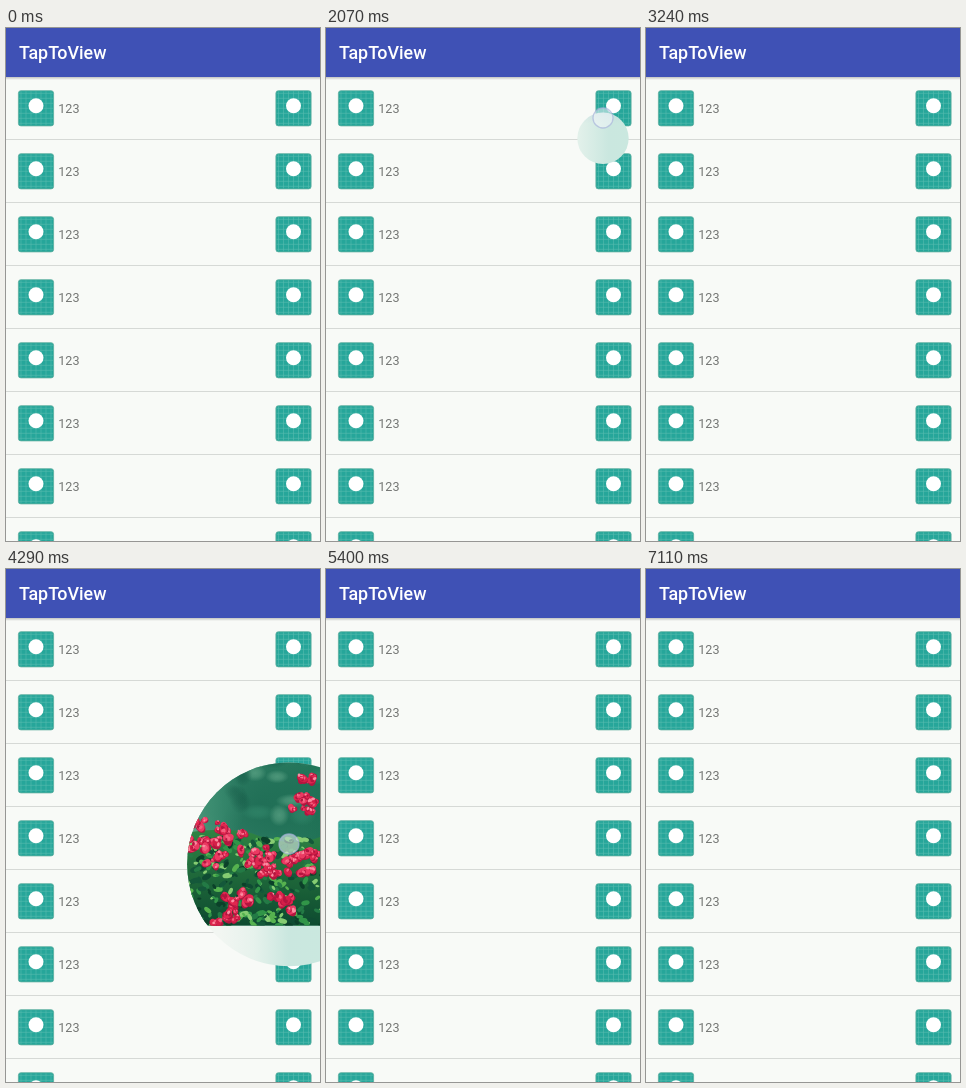
Write an HTML page that moves like this. It is 314 by 513 pixels and loops after 7500 ms.

```html
<!DOCTYPE html>
<html lang="en">
<head>
<meta charset="utf-8">
<title>TapToView</title>
<style>
html, body { margin: 0; width: 100%; height: 100%; overflow: hidden; background: #f8faf7; }
svg { display: block; width: 314px; height: 513px; }
text { font-family: Roboto, sans-serif; }
</style>
</head>
<body>
<svg viewBox="0 0 314 513" width="314" height="513">
  <defs>
    <linearGradient id="shade" x1="0" y1="0" x2="0" y2="1">
      <stop offset="0" stop-color="#000" stop-opacity=".22"/>
      <stop offset="1" stop-color="#000" stop-opacity="0"/>
    </linearGradient>
    <linearGradient id="sides">
      <stop offset="0" stop-color="#cfe9e1"/>
      <stop offset=".1" stop-color="#d4ece5"/>
      <stop offset=".24" stop-color="#ebf4ef"/>
      <stop offset=".36" stop-color="#f2f6f2"/>
      <stop offset=".68" stop-color="#f2f6f2"/>
      <stop offset=".79" stop-color="#e6f2ec"/>
      <stop offset=".9" stop-color="#cae7df"/>
      <stop offset="1" stop-color="#cae8df"/>
    </linearGradient>
    <linearGradient id="topBlur" x1="0" y1="0" x2="0" y2="1">
      <stop offset="0" stop-color="#3f51b5"/>
      <stop offset=".24" stop-color="#4254b6" stop-opacity=".95"/>
      <stop offset=".5" stop-color="#5565bd" stop-opacity=".58"/>
      <stop offset=".75" stop-color="#7a87cb" stop-opacity=".2"/>
      <stop offset="1" stop-color="#9aa5d8" stop-opacity="0"/>
    </linearGradient>
    <linearGradient id="trees">
      <stop offset="0" stop-color="#6fae78"/>
      <stop offset=".3" stop-color="#a6d3a8"/>
      <stop offset=".55" stop-color="#84bfa0"/>
      <stop offset=".7" stop-color="#3d8d72"/>
      <stop offset="1" stop-color="#217457"/>
    </linearGradient>
    <linearGradient id="bushFill" x1="0" y1="0" x2="0" y2="1">
      <stop offset="0" stop-color="#2f8443"/>
      <stop offset="1" stop-color="#0d4a30"/>
    </linearGradient>
    <linearGradient id="cypress" x1="0" y1="0" x2="0" y2="1">
      <stop offset="0" stop-color="#2f7a5e"/>
      <stop offset="1" stop-color="#4f9a7a"/>
    </linearGradient>
    <filter id="soft" x="-50%" y="-50%" width="200%" height="200%"><feGaussianBlur stdDeviation="1.2"/></filter>
    <clipPath id="frame"><rect y="157" width="314" height="199.5"/></clipPath>
    <clipPath id="reveal"><circle id="hole"/></clipPath>
    <g id="tile">
      <rect x=".4" y=".4" width="35.2" height="35.2" rx="2.5" fill="#26a69a" stroke="#5fae9f" stroke-width=".8"/>
      <path id="grid" stroke="#6cc4b8" stroke-width=".6" opacity=".7"/>
      <circle cx="18" cy="15.5" r="7.5" fill="#fff"/>
    </g>
  </defs>

  <rect width="314" height="513" fill="#f8faf7"/>
  <g id="list"></g>
  <rect y="49" width="314" height="3" fill="url(#shade)"/>
  <rect width="314" height="49" fill="#3f51b5"/>
  <text x="13" y="31" font-size="17.9" font-weight="500" fill="#fff">TapToView</text>

  <g id="view" clip-path="url(#reveal)">
    <rect width="314" height="513" fill="url(#sides)"/>
    <g id="corners"></g>
    <rect width="314" height="96" fill="url(#topBlur)"/>
    <g id="photo" clip-path="url(#frame)"></g>
  </g>
  <circle id="dot" r="10" fill="#f2f6fa" fill-opacity=".55" stroke="#a9b5dc" stroke-opacity=".7" stroke-width="1.3"/>
</svg>
<script>
const NS = 'http://www.w3.org/2000/svg';
const $ = id => document.getElementById(id);
const LOOP = 7500, OPEN = 400, CLOSE = 170, REACH = Math.hypot(314, 513);

function add(parent, tag, attrs, text) {
  const el = document.createElementNS(NS, tag);
  for (const k in attrs) el.setAttribute(k, attrs[k]);
  if (text) el.textContent = text;
  parent.appendChild(el);
  return el;
}

let seed = 11;
function rand(a, b) {
  seed = (seed * 16807) % 2147483647;
  return a + (b - a) * seed / 2147483647;
}
const pick = list => list[Math.floor(rand(0, list.length))];

// ellipse of one colour that fades out towards its rim
function glow(g, cx, cy, rx, ry, color, opacity = 1) {
  const id = 'glow' + color.slice(1);
  if (!$(id)) {
    const grad = add(document.querySelector('defs'), 'radialGradient', { id });
    for (const [offset, alpha] of [[0, 1], [.45, .75], [1, 0]])
      add(grad, 'stop', { offset, 'stop-color': color, 'stop-opacity': alpha });
  }
  add(g, 'ellipse', { cx, cy, rx, ry, opacity, fill: `url(#${id})` });
}

function buildList() {
  let d = '';
  for (let p = 3; p < 35; p += 5) d += `M${p} 1V35M1 ${p}H35`;
  $('grid').setAttribute('d', d);
  for (let i = 0; i < 9; i++) {
    const row = add($('list'), 'g', { transform: `translate(0 ${49 + i * 63})` });
    for (const x of [12, 269.5]) add(row, 'use', { href: '#tile', x, y: 13.3 });
    add(row, 'text', { x: 52.3, y: 35.8, 'font-size': 12.6, fill: '#747674' }, '123');
    add(row, 'rect', { y: 62, width: 314, height: 1, fill: '#d6d9d6' });
  }
}

function petal(g, x, y, r, fill) {
  const turn = `rotate(${rand(0, 180)} ${x} ${y})`;
  add(g, 'ellipse', { cx: x, cy: y, rx: r, ry: r * .7, fill, transform: turn });
}

function rose(g, x, y, r) {
  petal(g, x, y + r * .2, r * 1.1, '#b3153f');
  petal(g, x, y, r, pick(['#e0274f', '#ea3a62', '#d41f48']));
  for (let i = 0; i < 3; i++)
    petal(g, x + rand(-.6, .6) * r, y + rand(-.6, .3) * r, r * .38, pick(['#fb8ea3', '#f4607f', '#b3153f']));
}

function cluster(g, x, y, spread, n) {
  for (let i = 0; i < n; i++)
    rose(g, x + rand(-spread, spread), y + rand(-spread, spread) * .6, rand(2.5, 5.5));
}

function leaves(g, n, x0, x1, yTop) {
  for (let i = 0; i < n; i++) {
    const x = rand(x0, x1), y = rand(yTop(x), 358), r = rand(2, 5);
    add(g, 'ellipse', {
      cx: x, cy: y, rx: r, ry: r * .55, transform: `rotate(${rand(-70, 70)} ${x} ${y})`,
      fill: pick(['#56b24f', '#319548', '#86cc72', '#0b4029', '#14583a', '#0f4c33', '#237a45'])
    });
  }
}

function buildPhoto() {
  const g = $('photo');
  add(g, 'rect', { y: 157, width: 314, height: 200, fill: 'url(#trees)' });
  glow(g, 255, 235, 85, 60, '#1c6a52', .8);
  for (let i = 0; i < 26; i++)
    glow(g, rand(200, 320), rand(155, 250), rand(7, 17), rand(5, 12), pick(['#67ad8e', '#155a47', '#348a6d']), .6);
  for (let i = 0; i < 22; i++)
    glow(g, rand(0, 110), rand(160, 250), rand(8, 18), rand(6, 13), pick(['#d3ecc0', '#57a763', '#8cc987']), .7);
  glow(g, 115, 225, 38, 38, '#b9dfb8', .8);
  glow(g, 62, 156, 48, 16, '#f4fae4');
  glow(g, 155, 160, 75, 34, '#fbfdf2');
  glow(g, 165, 178, 50, 38, '#f0f8e8', .8);
  for (const [x, top, w] of [[149, 165, 11], [173, 175, 10]])
    add(g, 'path', {
      d: `M${x} ${top}C${x - w} ${top + 10} ${x - w} ${top + 30} ${x - w} 275H${x + w}C${x + w} ${top + 30} ${x + w} ${top + 10} ${x} ${top}`,
      fill: 'url(#cypress)', filter: 'url(#soft)', opacity: .9
    });
  glow(g, 205, 235, 35, 40, '#3c8f72', .7);

  add(g, 'path', { d: 'M0 285Q50 270 100 285V357H0Z', fill: '#1d6145', opacity: .85 });
  leaves(g, 70, 0, 95, () => 275);
  for (const [x, y] of [[24, 294], [40, 292], [14, 322], [58, 300], [78, 268]]) cluster(g, x, y, 8, 6);

  // fence, narrowing with distance
  const iron = '#0d3038';
  for (let i = 0; i < 12; i++) {
    const x = 6 + 12.1 * i - .345 * i * i, top = 158 + x * .5, w = 5 - i * .18;
    add(g, 'path', { d: `M${x} ${top - 5}L${x + w / 2} ${top + 3}V357H${x - w / 2}V${top + 3}Z`, fill: iron });
  }
  add(g, 'path', { d: 'M0 183L106 231V236L0 190Z', fill: '#1f4f59' });
  add(g, 'path', { d: 'M103.5 209H115V268H103.5ZM102 203H117V209H102Z', fill: '#1f4f59' });
  add(g, 'circle', { cx: 110.5, cy: 194.5, r: 5.2, fill: iron });
  add(g, 'path', { d: 'M107 199H114V204H107Z', fill: iron });

  glow(g, 8, 243, 30, 18, '#4bb548');
  glow(g, 60, 328, 40, 16, '#5aba4a', .85);
  glow(g, 20, 338, 36, 17, '#4aa848', .8);
  glow(g, 78, 325, 14, 12, '#dd8a4e', .8);

  add(g, 'path', { d: 'M72 357Q76 290 98 278Q128 266 160 268Q205 256 245 264Q285 280 314 268V357Z', fill: 'url(#bushFill)' });
  leaves(g, 520, 78, 316, x => 268 + Math.max(0, 112 - x) * .6);
  const spots = [[204, 262, 20, 20], [184, 270, 16, 12], [250, 288, 17, 18], [262, 300, 13, 11], [104, 270, 12, 12],
    [98, 297, 13, 11], [232, 330, 13, 12], [276, 334, 13, 11], [298, 234, 14, 16], [300, 208, 8, 6],
    [145, 314, 10, 9], [292, 294, 16, 13], [155, 270, 12, 6], [208, 292, 12, 7], [227, 345, 9, 6],
    [207, 354, 5, 3], [230, 265, 10, 7], [68, 342, 4, 3], [308, 285, 7, 6]];
  for (const s of spots) cluster(g, ...s);
}

const holds = [
  { down: 1680, open: 2018, up: 2790, x: 277, y: 90 },
  { down: 3990, open: 4183, up: 4880, x: 283, y: 275 },
  { down: 5640, open: 5850, up: 6640, x: 281.5, y: 454 }
];
const clamp = v => Math.min(1, Math.max(0, v));
const ease = v => .5 - .5 * Math.cos(Math.PI * clamp(v));

function place(el, x, y) {
  el.setAttribute('cx', x);
  el.setAttribute('cy', y);
}

function draw(t) {
  const dot = $('dot'), view = $('view'), hole = $('hole');
  const p = clamp((t - 770) / 640);
  const scroll = 20.5 * Math.sin(Math.PI * p) ** 2;
  $('list').setAttribute('transform', `translate(0 ${-scroll})`);

  let dotAlpha = 0, viewAlpha = 0;
  if (t >= 720 && t < 1440) {
    dotAlpha = 1;
    place(dot, 225.5, 157 - scroll);
  }
  for (const h of holds) {
    const fadeAt = h.up + 70;
    if (t < h.down || t > fadeAt + CLOSE) continue;
    dotAlpha = 1 - clamp((t - fadeAt) / 80);
    place(dot, h.x, h.y);
    if (t <= h.open) continue;
    viewAlpha = 1 - clamp((t - fadeAt) / CLOSE);
    place(hole, h.x, h.y + 20.3);
    hole.setAttribute('r', REACH * ease((t - h.open) / OPEN));
  }
  dot.setAttribute('opacity', dotAlpha);
  view.setAttribute('opacity', viewAlpha);
  view.setAttribute('display', viewAlpha ? 'inline' : 'none');
}

buildList();
buildPhoto();
for (const x of [22, 290]) glow($('corners'), x, 520, 55, 60, '#addccf', .6);
const start = performance.now();
function tick() {
  draw((performance.now() - start) % LOOP);
  requestAnimationFrame(tick);
}
tick();
</script>
</body>
</html>
```
